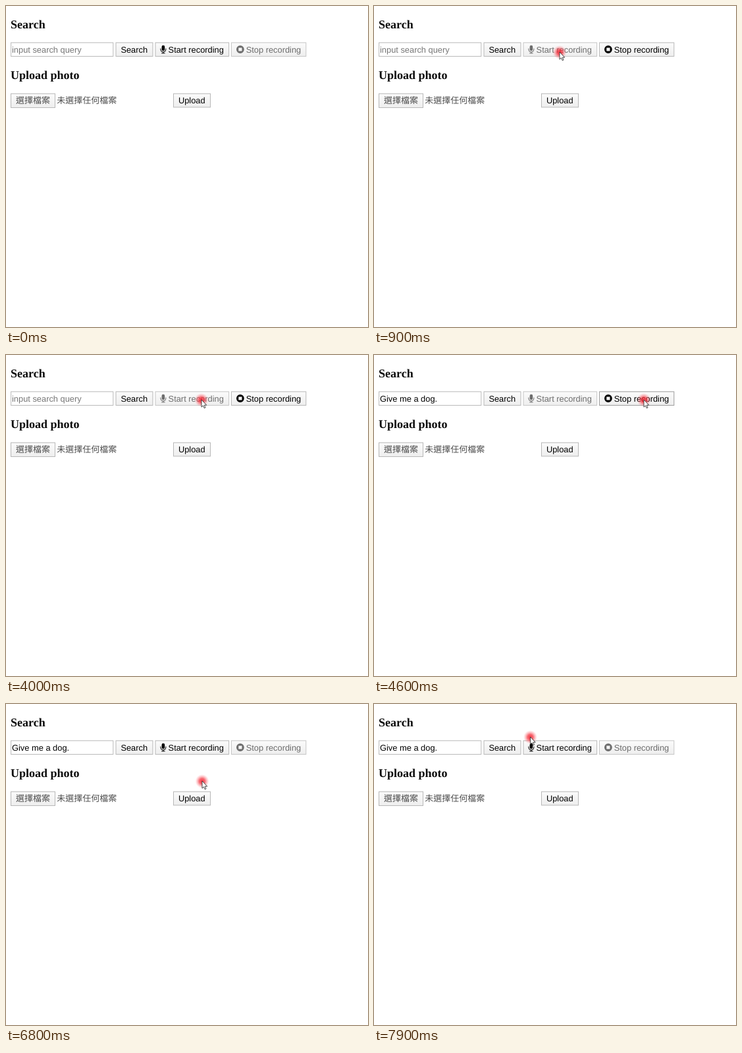
Animation of 550x488 px, one loop 8 s. Source, as an HTML page:

```html
<!DOCTYPE html>
<html lang="en">
<head>
<meta charset="utf-8">
<title>Voice search form</title>
<style>
  html, body { margin: 0; width: 100%; height: 100%; overflow: hidden; background: #fff; }
  svg { display: block; width: 550px; height: 488px; }
  text { font: 12.85px "Liberation Sans", Arial, sans-serif; text-rendering: geometricPrecision; }
  .head { font: bold 18.03px "Liberation Serif", "Times New Roman", serif; fill: #0c0c0c; }
  .cjk { font: 300 13px "Noto Sans CJK TC", "Noto Sans CJK", sans-serif; fill: #4c4c4c; }
  .tip { font: 9.5px "Open Sans", sans-serif; fill: #5c5c5c; }
  .btn rect { fill: url(#face); stroke: #b8b8b8; }
  .btn.hover rect { stroke: #9c9c9c; }
  .btn.off { fill: #6d6d6d; }
  .btn.off rect { stroke: #c6c6c6; }
</style>
</head>
<body>
<svg viewBox="0 0 550 488">
  <defs>
    <linearGradient id="face" x1="0" y1="0" x2="0" y2="1">
      <stop offset="0" stop-color="#fbfbfb"/>
      <stop offset="1" stop-color="#eeeeee"/>
    </linearGradient>
    <radialGradient id="glow">
      <stop offset="0" stop-color="#f01a28" stop-opacity=".88"/>
      <stop offset=".4" stop-color="#f52e3a" stop-opacity=".72"/>
      <stop offset=".75" stop-color="#fa5a64" stop-opacity=".28"/>
      <stop offset="1" stop-color="#ff7880" stop-opacity="0"/>
    </radialGradient>
  </defs>

  <text class="head" x="7" y="33.5">Search</text>
  <text class="head" x="7" y="110.8">Upload photo</text>

  <rect x="7.6" y="55.8" width="155.2" height="20.7" fill="#fff" stroke="#bababa"/>
  <text id="query" x="9" y="70.5"></text>

  <g class="btn" id="search">
    <rect x="167" y="55.8" width="56" height="20.7"/>
    <text x="174.4" y="70.5">Search</text>
  </g>
  <g class="btn" id="start">
    <rect x="227" y="55.8" width="111.6" height="20.7"/>
    <g fill="none" id="mic">
      <path d="M238.9 62V66" stroke-width="4.6" stroke-linecap="round"/>
      <path d="M234.9 64.6v1.4a4 4 0 0 0 8 0v-1.4M238.9 70v2M236.2 71.8h5.4"/>
    </g>
    <text x="246.6" y="70.5">Start recording</text>
  </g>
  <g class="btn" id="stop">
    <rect x="342.5" y="55.8" width="113.3" height="20.7"/>
    <path fill-rule="evenodd" d="M350 66a5.9 5.9 0 1 1 11.8 0a5.9 5.9 0 1 1 -11.8 0zM353.3 63.4v5.2h5.2v-5.2z"/>
    <text x="364.7" y="70.5">Stop recording</text>
  </g>

  <g class="btn" id="choose">
    <rect x="7.5" y="133.3" width="67" height="21.2"/>
    <text class="cjk" x="15" y="148.4">選擇檔案</text>
  </g>
  <text class="cjk" x="77.3" y="148.4">未選擇任何檔案</text>
  <g class="btn" id="upload">
    <rect x="254.5" y="133.3" width="56" height="20.6"/>
    <text x="261.9" y="148.1">Upload</text>
  </g>

  <g id="tip">
    <rect x="417.3" y="78.4" width="92.8" height="19" fill="#fff" stroke="#8a8a8a"/>
    <text class="tip" x="422.8" y="91">Stop Transcription</text>
  </g>

  <g id="pointer">
    <circle cy="-.6" r="10.5" fill="url(#glow)"/>
    <path d="M0 -1V10.2L2.5 7.9L4.2 11.8L6 11L4.3 7.2H7.7Z" fill="#fff" stroke="#333" stroke-width=".9"/>
  </g>
</svg>
<script>
const LOOP = 8000, STEP = 100;
const $ = id => document.getElementById(id);
const buttons = ["search", "start", "stop", "choose", "upload"].map($);

// Pointer path: time, x, y
const path = [
  [100, 219, 106], [200, 219, 106], [600, 282, 71], [3900, 282, 71],
  [4000, 297, 69], [4100, 306, 69], [4200, 306, 69], [4500, 410, 69],
  [6700, 410, 69], [6800, 298, 118], [7000, 172, 162], [7200, 89, 146],
  [7400, 50, 145], [7600, 142, 104], [7900, 237.5, 51]
];

function pointerAt(t) {
  const i = path.findIndex(p => p[0] >= t);
  if (i < 1) return path[i < 0 ? path.length - 1 : 0].slice(1);
  const [t0, x0, y0] = path[i - 1], [t1, x1, y1] = path[i];
  const k = (t - t0) / (t1 - t0);
  return [x0 + (x1 - x0) * k, y0 + (y1 - y0) * k];
}

const between = (v, a, b) => v >= a && v < b;

function inside(button, x, y) {
  const r = button.querySelector("rect").getBBox();
  return between(x, r.x, r.x + r.width) && between(y, r.y, r.y + r.height);
}

function draw(time) {
  const t = Math.floor(time % LOOP / STEP) * STEP;
  const [x, y] = pointerAt(t);
  const shown = t >= 100;
  const recording = between(t, 800, 6100);
  const heard = t >= 4500;

  $("pointer").style.display = shown ? "" : "none";
  $("pointer").setAttribute("transform", `translate(${x} ${y})`);
  $("tip").style.display = between(t, 4900, 6000) ? "" : "none";
  $("query").textContent = heard ? "Give me a dog." : "input search query";
  $("query").setAttribute("fill", heard ? "#000" : "#777");

  for (const b of buttons) {
    const off = b.id === "start" ? recording : b.id === "stop" && !recording;
    b.classList.toggle("off", off);
    b.classList.toggle("hover", shown && !off && inside(b, x, y));
  }
  $("mic").setAttribute("stroke", recording ? "#6d6d6d" : "#000");
}

const begin = performance.now();
function tick() {
  draw(performance.now() - begin);
  requestAnimationFrame(tick);
}
tick();
</script>
</body>
</html>
```
